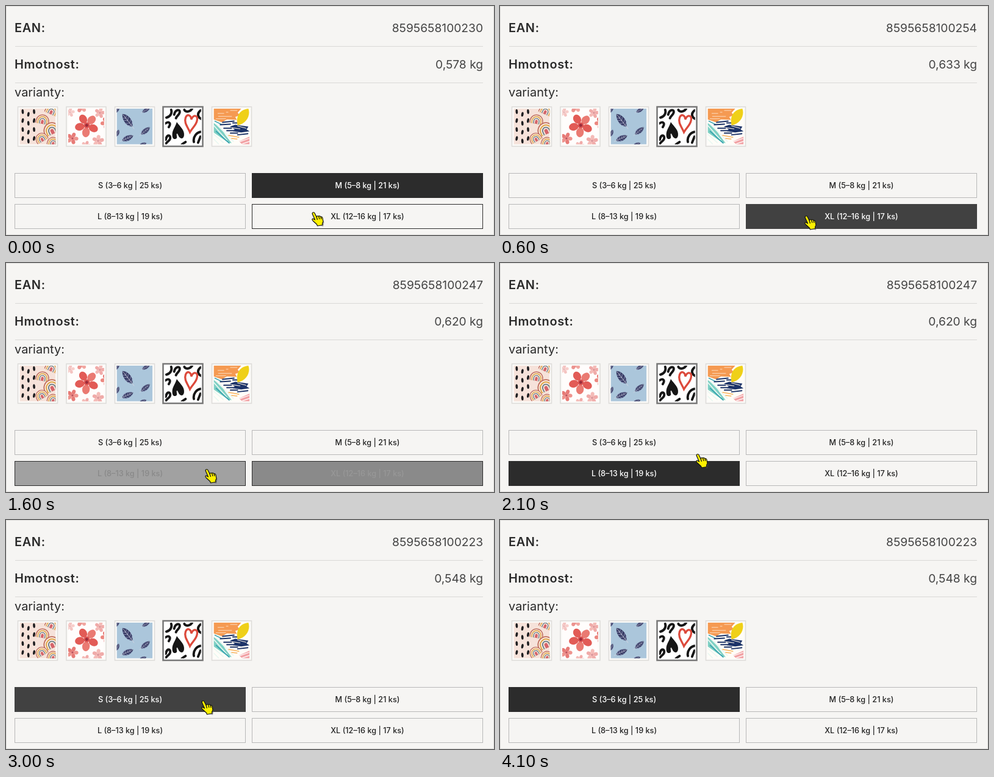
An HTML page that plays this animation: 800 by 377 pixels, repeating every 4200 ms.

```html
<!DOCTYPE html>
<html lang="cs">
<head>
<meta charset="utf-8">
<title>Varianty</title>
<style>
  html, body { margin: 0; width: 100%; height: 100%; overflow: hidden; background: #f6f5f3; }
  svg { display: block; }
  text { font-family: Inter, "Open Sans", sans-serif; font-size: 20px; fill: #2a2a2a; }
  .label { font-weight: 600; letter-spacing: .03em; }
  .value { font-size: 19.2px; text-anchor: end; fill: #444; }
  .size { font-size: 12.7px; font-weight: 500; text-anchor: middle; }
</style>
</head>
<body>
<svg id="stage" width="800" height="377" viewBox="0 0 800 377">
  <defs><clipPath id="crop"><rect width="60" height="60"/></clipPath></defs>
  <rect x=".5" y=".5" width="799" height="376" fill="#f6f5f3" stroke="#dedddb"/>
  <path d="M15 66.5H782M15 126.5H782" stroke="#dad9d7"/>
  <text class="label" x="14" y="43">EAN:</text>
  <text class="label" x="14" y="103">Hmotnost:</text>
  <text x="14" y="149">varianty:</text>
  <text class="value" id="ean" x="782" y="43"></text>
  <text class="value" id="weight" x="782" y="103"></text>
  <g id="thumbs"></g>
  <g id="sizes"></g>
  <g id="hand" stroke="#111" stroke-width="1.2" stroke-linejoin="round">
    <path d="M10 21L20 24L21.500 17L18 9Z" fill="#555" stroke="none" opacity=".5"/>
    <path fill="#fdf000" d="M3 1Q5.500 0 6.500 3L9 8Q10 6 12.500 7Q14.500 6 16 8Q18.500 7.500 19 10L20 16L18.500 19L19 21.500L10.500 23L9.500 20.500L3.500 15Q.5 12 3 11L6.500 13L2.500 4Q1.500 2 3 1Z"/>
    <path fill="none" d="M9 8L10.500 13M12.500 7L14 12M16 8L17 12"/>
  </g>
</svg>
<script>
const $ = id => document.getElementById(id);
const rect = (x, y, w, h, attrs) => `<rect x="${x}" y="${y}" width="${w}" height="${h}" ${attrs}/>`;
const path = (d, color, width = 0) => width
  ? `<path d="${d}" fill="none" stroke="${color}" stroke-width="${width}" stroke-linecap="round"/>`
  : `<path d="${d}" fill="${color}"/>`;
const oval = (x, y, rx, ry, angle, color) =>
  `<ellipse rx="${rx}" ry="${ry}" fill="${color}" transform="translate(${x} ${y}) rotate(${angle})"/>`;
const place = (x, y, angle, scale, art) =>
  `<g transform="translate(${x} ${y}) rotate(${angle}) scale(${scale})">${art}</g>`;
const range = n => [...Array(n).keys()];

// Thumbnails, each drawn on a 60 x 60 tile
const rainbow = ['#c0705f', '#fbe9df', '#dca23f', '#fbe9df', '#6d7f88', '#fbe9df', '#d5656b']
  .map((c, i) => path(`M${i * 2 - 15} 6V0A${15 - i * 2} ${15 - i * 2} 0 0 1 ${15 - i * 2} 0V6Z`, c)).join('');
const flower = range(5).map(i => oval(12 * Math.sin(i * 1.257), -12 * Math.cos(i * 1.257), 6.3, 8, i * 72,
  i % 2 ? '#ea7a72' : '#e25b56')).join('')
  + oval(0, 0, 5, 5, 0, '#dc5654') + oval(0, 0, 2.5, 2.5, 0, '#9d2c3b');
const feather = path('M0 -18C8 -11 10 4 0 14C-10 4 -7 -11 0 -18Z', '#353a63')
  + path('M-5 -6L0 -1L5 -6M-7 0L0 5L7 0M-4 -11L0 -7L4 -11M-6 6L0 10L6 6', '#8d8fb4', 1.2)
  + path('M0 -16V19', '#dcd8e2', .9);
const heart = 'M0 16C-5 7 -12 1 -10 -8C-8 -16 -1 -13 0 -6C3 -16 11 -14 10 -6C10 2 4 7 0 16Z';

const tiles = [
  rect(0, 0, 60, 60, 'fill="#f6e2da"')
    + range(12).map(i => oval(5 + i % 3 * 9.5, 5 + (i / 3 | 0) * 15 + i % 3 * 4.5 % 9, 1.9, 3.9, i % 2 * 14 - 4, '#1d1d20')).join('')
    + place(53, 5, 25, .75, rainbow) + place(38, 21, 10, .75, rainbow)
    + place(54, 37, -25, .95, rainbow) + place(37, 51, -30, .7, rainbow) + place(56, 58, 15, .7, rainbow),
  rect(0, 0, 60, 60, 'fill="#fffdfc"')
    + [[3, 6, .4, .35], [22, -3, .5, .65], [53, 7, .45, .5], [7, 50, .5, .8], [50, 54, .5, .5], [64, 24, .5, .9], [30, 62, .4, .5]]
      .map(([x, y, s, o]) => `<g opacity="${o}">${place(x, y, x * 3, s, flower)}</g>`).join('')
    + place(31, 28, -30, 1, flower),
  rect(0, 0, 60, 60, 'fill="#abc6db"')
    + [[19, 21, -38, .85], [0, 3, 35, .4], [48, 3, 60, .45], [17, 50, 65, .65], [47, 38, 50, .6], [1, 42, 20, .4], [43, 60, 70, .4]]
      .map(f => place(...f, feather)).join(''),
  rect(0, 0, 60, 60, 'fill="#fff"')
    + path('M2 15C8 14 12 8 10 2M15 10C17 1 26 0 24 7C23 11 19 12 18 16M32 2C35 7 42 5 45 0M59 3C53 8 54 14 60 17'
      + 'M0 25C7 20 10 25 6 31M1 52C3 42 10 44 8 51C6 56 2 55 1 60M48 56C46 47 53 40 59 39M59 47L55 57M28 60L34 56', '#161616', 4)
    + place(21, 38, 174, .98, path(heart, '#161616')) + path('M20 43L21 51', '#fff', 2)
    + place(43, 24, 6, .98, path(heart, '#dc4a3c', 3.4)),
  rect(0, 0, 60, 60, 'fill="#fffdf8"')
    + path('M0 0H46L40 7L44 11L36 14L39 19L22 18L14 23L0 18Z', '#f59a52')
    + path('M7 8H17M21 6H24M8 13H30M28 3H39M4 17H20', '#fde0c4', 1)
    + path('M0 24L12 33L20 45L30 58L24 57L0 40Z', '#7fd0c4')
    + path('M0 28L22 53M0 43L16 57M4 26L33 55M0 51L8 59', '#e9f7f2', 1.7)
    + path('M2 21L14 27M4 38L26 58', '#2e9dad', 1.5)
    + path('M27 30L36 27L58 30L55 35L60 38L46 40L32 38L35 35Z', '#1d3469')
    + path('M15 23L34 21M11 27L28 26M32 24H44M17 33H30M22 37H34M40 44L57 42M28 41H40', '#1d3469', 2)
    + path('M30 32L44 34M40 29L54 33M20 30H27', '#f7efe2', 1.1)
    + path('M40 28C36 13 44 1 58 0C62 11 55 25 40 28Z', '#efd018')
    + path('M42 55L60 47V60H48Z', '#f2a3a6') + path('M42 56L59 50M48 59L60 55', '#fff', 1.2)
    + path('M25 45L42 48M30 50L39 51', '#f8b25c', 1.6)
];
$('thumbs').innerHTML = tiles.map((art, i) => {
  const x = 19 + i * 79.500, chosen = i === 3;
  return (chosen ? rect(x, 166, 65, 65, 'fill="#fff" stroke="#777" stroke-width="2.5"')
    : rect(x + .5, 166, 65, 65, 'fill="#fbfaf8" stroke="#dddcd9" stroke-width="1.5"'))
    + `<g transform="translate(${x + 3.5} 169) scale(.98)" clip-path="url(#crop)">${art}</g>`;
}).join('');

const sizes = [
  { label: 'S (3–6 kg | 25 ks)', x: 14, y: 275, ean: '8595658100223', weight: '0,548 kg' },
  { label: 'M (5–8 kg | 21 ks)', x: 403, y: 275, ean: '8595658100230', weight: '0,578 kg' },
  { label: 'L (8–13 kg | 19 ks)', x: 14, y: 326, ean: '8595658100247', weight: '0,620 kg' },
  { label: 'XL (12–16 kg | 17 ks)', x: 403, y: 326, ean: '8595658100254', weight: '0,633 kg' }
];
$('sizes').innerHTML = sizes.map(s => '<g>' + rect(s.x + .5, s.y + .5, 378, 40, '')
  + `<text class="size" x="${s.x + 189.500}" y="${s.y + 25}">${s.label}</text></g>`).join('');

const LOOP = 4200, STEP = 100, FADE = 300;
const clicks = [[-1000, 1], [200, 3], [1460, 2], [2600, 0]];  // time, size
const route = [  // time, x, y of the cursor's corner
  [0, 500, 339], [200, 498, 345], [900, 498, 345], [1400, 325, 339], [1700, 325, 339],
  [2100, 320, 314], [2400, 319, 297], [3200, 319, 297], [3600, 290, 328], [4000, 235, 380], [LOOP, 235, 380]
];
const clamp = v => Math.max(0, Math.min(1, v));
const mix = (a, b, p) => a + (b - a) * p;
const gray = v => `rgb(${v},${v},${v})`;

function cursorAt(t) {
  const i = route.findIndex(r => r[0] > t), [t0, x0, y0] = route[i - 1], [t1, x1, y1] = route[i];
  const p = (t - t0) / (t1 - t0), eased = p * p * (3 - 2 * p);
  return [mix(x0, x1, eased), mix(y0, y1, eased)];
}

function draw(t) {
  const [cx, cy] = cursorAt(t);
  $('hand').setAttribute('transform', `translate(${cx} ${cy})`);
  const current = sizes[clicks.filter(c => c[0] <= t).pop()[1]];
  $('ean').textContent = current.ean;
  $('weight').textContent = current.weight;
  sizes.forEach((s, i) => {
    const n = clicks.findIndex(c => c[1] === i), next = clicks[n + 1];
    const fade = time => clamp((t - time) / FADE);
    const dark = fade(clicks[n][0]) - (next ? fade(next[0]) : 0);
    const tipX = cx + 3, tipY = cy + 2;
    const hover = tipX > s.x && tipX < s.x + 379 && tipY > s.y && tipY < s.y + 41;
    const [box, label] = $('sizes').children[i].children;
    box.style.fill = dark ? gray(mix(245, hover ? 65 : 44, dark)) : '#f6f5f3';
    box.style.stroke = gray(dark === 1 && hover ? 65 : hover || dark > .1 ? 44 : 184);
    label.style.fill = gray(mix(34, 255, dark));
  });
}

function tick() {
  draw(Math.floor(performance.now() % LOOP / STEP) * STEP);
  requestAnimationFrame(tick);
}
tick();
</script>
</body>
</html>
```
